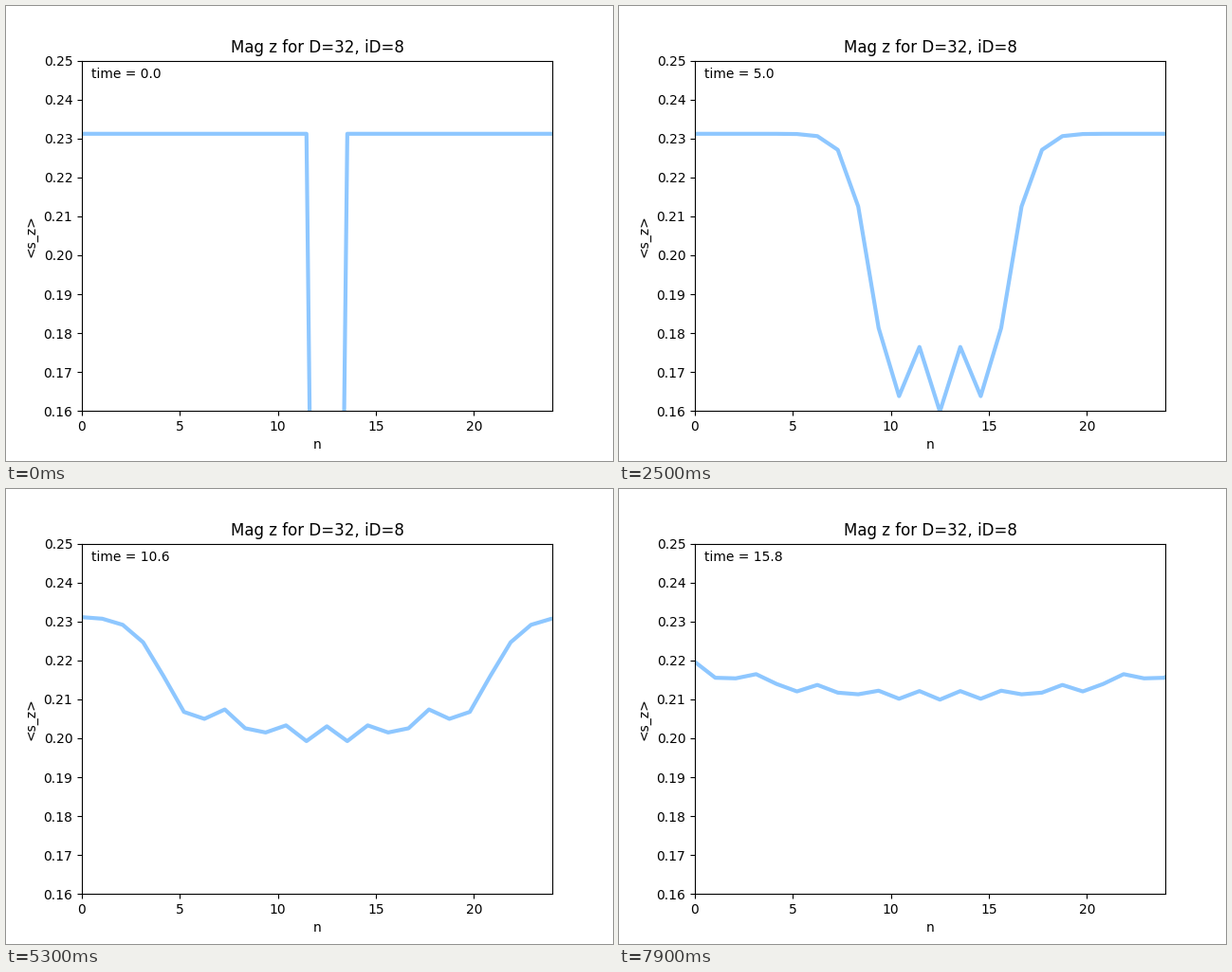
Write a matplotlib script that moves like this. It is 640 px wide and 480 px high and loops after 8 s.

```python
import numpy as np
import matplotlib.pyplot as plt
from matplotlib.animation import FuncAnimation

FRAMES, INTERVAL, DT = 80, 100, 0.2
SITES, MID = 25, 12
M0 = 0.2312                            # uniform magnetisation
SPEED, BETA, GAMMA = 0.873, 0.91, 0.018

theta = np.linspace(0, 2 * np.pi, 128, endpoint=False)
x = np.linspace(0, 25, SITES)
dist = np.arange(SITES) - MID


def bessel(n, z):
    """Integer-order Bessel functions J_n(z) from their integral form."""
    return np.cos(np.outer(n, theta) - z * np.sin(theta)).mean(axis=1)


def profile(t):
    """Magnetisation after one flipped spin has spread for time t."""
    z = SPEED * t

    def pair(r):
        return bessel(dist - r, z) * bessel(dist + r, z)

    return M0 * (1 - 2 * (pair(0) - BETA * pair(1) - GAMMA * pair(2)))


plt.rcParams["font.family"] = "DejaVu Sans"
fig, ax = plt.subplots(figsize=(6.4, 4.8), dpi=100)
ax.set(xlim=(0, 24), ylim=(0.16, 0.25), xlabel="n", ylabel="<s_z>",
       title="Mag z for D=32, iD=8")
line, = ax.plot(x, profile(0), lw=3, color="dodgerblue", alpha=0.5)
label = ax.text(0.02, 0.95, "", transform=ax.transAxes)


def update(i):
    t = i * DT
    line.set_ydata(profile(t))
    label.set_text(f"time = {t:.1f}")
    return line, label


anim = FuncAnimation(fig, update, frames=FRAMES, interval=INTERVAL,
                     repeat=True, repeat_delay=0)
plt.show()
```
